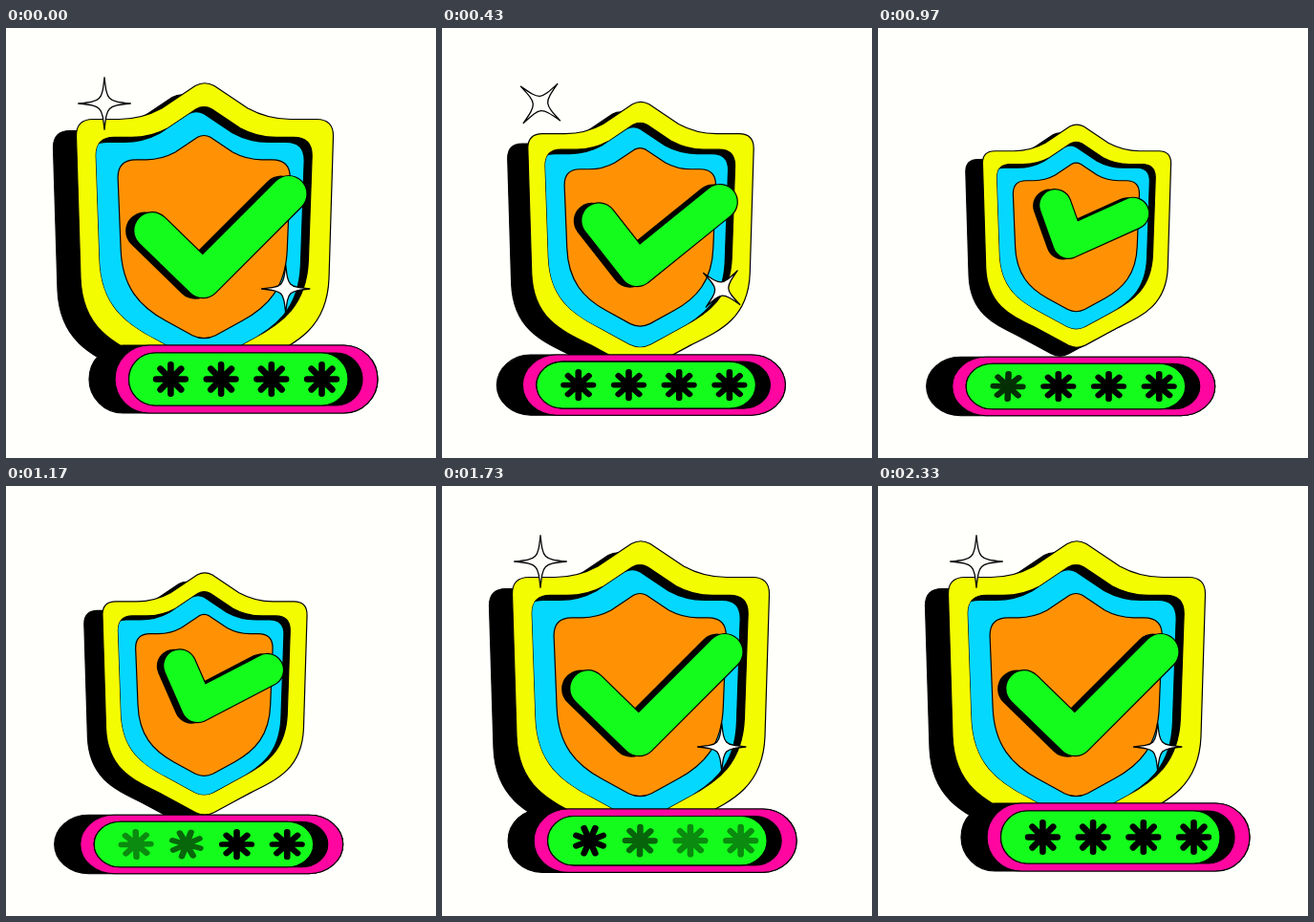
Animation, 450 px wide and 450 px high, one loop 2360 ms. Source, as an HTML page with a canvas:

```html
<!DOCTYPE html>
<html lang="en">
<head>
<meta charset="utf-8">
<title>Password shield</title>
<style>
html, body { margin: 0; width: 100%; height: 100%; overflow: hidden; background: #fffffc; }
canvas { display: block; width: 450px; height: 450px; }
</style>
</head>
<body>
<canvas id="stage" width="450" height="450"></canvas>
<script>
const ctx = document.getElementById('stage').getContext('2d');
const LOOP = 2360;
const INK = '#000', PAPER = '#fffffc', YELLOW = '#f4fc02', CYAN = '#04d8ff',
      ORANGE = '#ff9204', GREEN = '#14fc1c', PINK = '#ff06a0';

const mix = (a, b, p) => a + (b - a) * p;
const clamp = v => Math.min(1, Math.max(0, v));
const ease = u => u < 0.5 ? 4 * u ** 3 : 1 - 4 * (1 - u) ** 3;
const linear = u => u;
const ramp = (t, start, duration, curve = ease) => curve(clamp((t - start) / duration));
// Goes 0 -> 1 -> 0 over the loop
const swing = (t, out, outTime, back, backTime = outTime, curve = ease) =>
  ramp(t, out, outTime, curve) - ramp(t, back, backTime, curve);

// Shield outline around its scaling centre; softness rounds corners and base
function shieldPath(softness) {
  const r = mix(17.5, 28, softness);
  const side = mix(42, 15, softness);
  const low = mix(95, 75, softness);
  const cx = mix(95, 100, softness), cy = mix(110, 105, softness);
  const tip = mix(12, 18, softness);
  const tipY = 153 - (tip - 12) / 2;
  const top = -124.5, edge = top + r;
  return new Path2D(`M-10-159.5 Q0-165 10-159.5 L45-136 Q66 ${top} 90 ${top}
    L${134.5 - r} ${top} Q134.5 ${top} 134.5 ${edge} L130 ${side}
    C128 ${low} ${cx} ${cy} 60 127 L${tip} ${tipY} Q0 159 ${-tip} ${tipY} L-60 127
    C${-cx} ${cy} -128 ${low} -130 ${side} L-134.5 ${edge}
    Q-134.5 ${top} ${r - 134.5} ${top} L-90 ${top} Q-66 ${top} -45-136 Z`);
}

const outerShield = shieldPath(0);
const middleShield = shieldPath(0.5);
const innerShield = shieldPath(1);

function group(draw) {
  ctx.save();
  draw();
  ctx.restore();
}

function paint(path, fill, lineWidth) {
  ctx.fillStyle = fill;
  ctx.fill(path);
  ctx.strokeStyle = INK;
  ctx.lineWidth = lineWidth;
  ctx.stroke(path);
}

function shifted(dx, dy, draw) {
  group(() => {
    ctx.translate(dx, dy);
    draw();
  });
}

function drawShield(t) {
  const scale = mix(1, 0.733, swing(t, 171, 537, 962));
  const line = 1.2 / scale;
  group(() => {
    ctx.translate(208, 220);
    ctx.scale(scale, scale);
    shifted(-24, 12, () => paint(outerShield, INK, line));
    paint(outerShield, YELLOW, line);
    group(() => {
      ctx.translate(-0.8, -1.1);
      ctx.scale(0.84, 0.84);
      paint(middleShield, INK, line / 0.84);
      ctx.clip(middleShield);
      ctx.translate(-9.5, 6);
      paint(middleShield, CYAN, line / 0.84);
    });
    ctx.translate(-0.8, 1.2);
    ctx.scale(0.67, 0.67);
    paint(innerShield, ORANGE, line / 0.67);
  });
}

function drawCheck(t) {
  const p = swing(t, 171, 622, 961);
  const x = mix(206, 199.5, p), y = mix(263.5, 224.5, p);
  const arm = (angle, length) => {
    const a = angle * Math.PI / 180;
    return [x + length * Math.cos(a), y + length * Math.sin(a)];
  };
  const path = new Path2D();
  path.moveTo(...arm(mix(224.2, 250.3, p), mix(74, 41.4, p)));
  path.lineTo(x, y);
  path.lineTo(...arm(mix(-45, -24.3, p), mix(127, 74, p)));
  const width = mix(38.4, 33.6, p);
  const line = (color, w) => {
    ctx.strokeStyle = color;
    ctx.lineWidth = w;
    ctx.stroke(path);
  };
  group(() => {
    ctx.lineCap = ctx.lineJoin = 'round';
    shifted(mix(-8, -6, p), 0.5, () => line(INK, width + 1.2));
    line(INK, width + 1.2);
    line(GREEN, width - 1.2);
  });
}

function pill(left, right, height, fill) {
  const path = new Path2D();
  path.roundRect(left, -height / 2, right - left, height, height / 2);
  paint(path, fill, 1.2);
}

function drawAsterisk(x, angle, alpha) {
  group(() => {
    ctx.translate(x, 0);
    ctx.rotate(angle);
    ctx.globalAlpha = alpha;
    ctx.lineWidth = 6.6;
    ctx.lineCap = 'round';
    ctx.beginPath();
    for (let i = 0; i < 4; i++) {
      const c = 15.3 * Math.cos(i * Math.PI / 4), s = 15.3 * Math.sin(i * Math.PI / 4);
      ctx.moveTo(-c, -s);
      ctx.lineTo(c, s);
    }
    ctx.stroke();
  });
}

function drawPanel(t) {
  const p = swing(t, 171, 405, 1530, 400);
  group(() => {
    ctx.translate(mix(0, -36.3, p), mix(367.5, 375, p));
    ctx.scale(1, mix(1, 0.866, p));
    pill(87, 389, 71, INK);
    pill(114, 389, 71, PINK);
    pill(128.5, 373, 55, INK);
    pill(128.5, 358, 55, GREEN);
    for (let i = 0; i < 4; i++) {
      const out = 920 + 140 * i, back = 1550 + 140 * i;
      const dim = swing(t, out, 150, back, 150, linear);
      const turn = ramp(t, out, 300) + ramp(t, back, 300);
      drawAsterisk(172.4 + 52.7 * i, turn * Math.PI / 2, mix(1, 0.45, dim));
    }
  });
}

function drawStar(t, x, y, radius) {
  const r = radius * (1 - swing(t, 400, 530, 1400, 300));
  if (r < 0.5) return;
  const k = r * 0.1;
  const path = new Path2D();
  path.moveTo(0, -r);
  path.bezierCurveTo(k, -k, k, -k, r, 0);
  path.bezierCurveTo(k, k, k, k, 0, r);
  path.bezierCurveTo(-k, k, -k, k, -r, 0);
  path.bezierCurveTo(-k, -k, -k, -k, 0, -r);
  path.closePath();
  group(() => {
    ctx.translate(x, y);
    ctx.rotate(swing(t, 171, 537, 1400, 300) * Math.PI / 2);
    ctx.lineJoin = 'round';
    paint(path, PAPER, 1.3);
  });
}

function frame() {
  const t = performance.now() % LOOP;
  ctx.fillStyle = PAPER;
  ctx.fillRect(0, 0, 450, 450);
  drawShield(t);
  drawCheck(t);
  drawPanel(t);
  drawStar(t, 103, 79, 27.3);
  drawStar(t, 292.7, 273, 25.2);
  requestAnimationFrame(frame);
}
frame();
</script>
</body>
</html>
```
